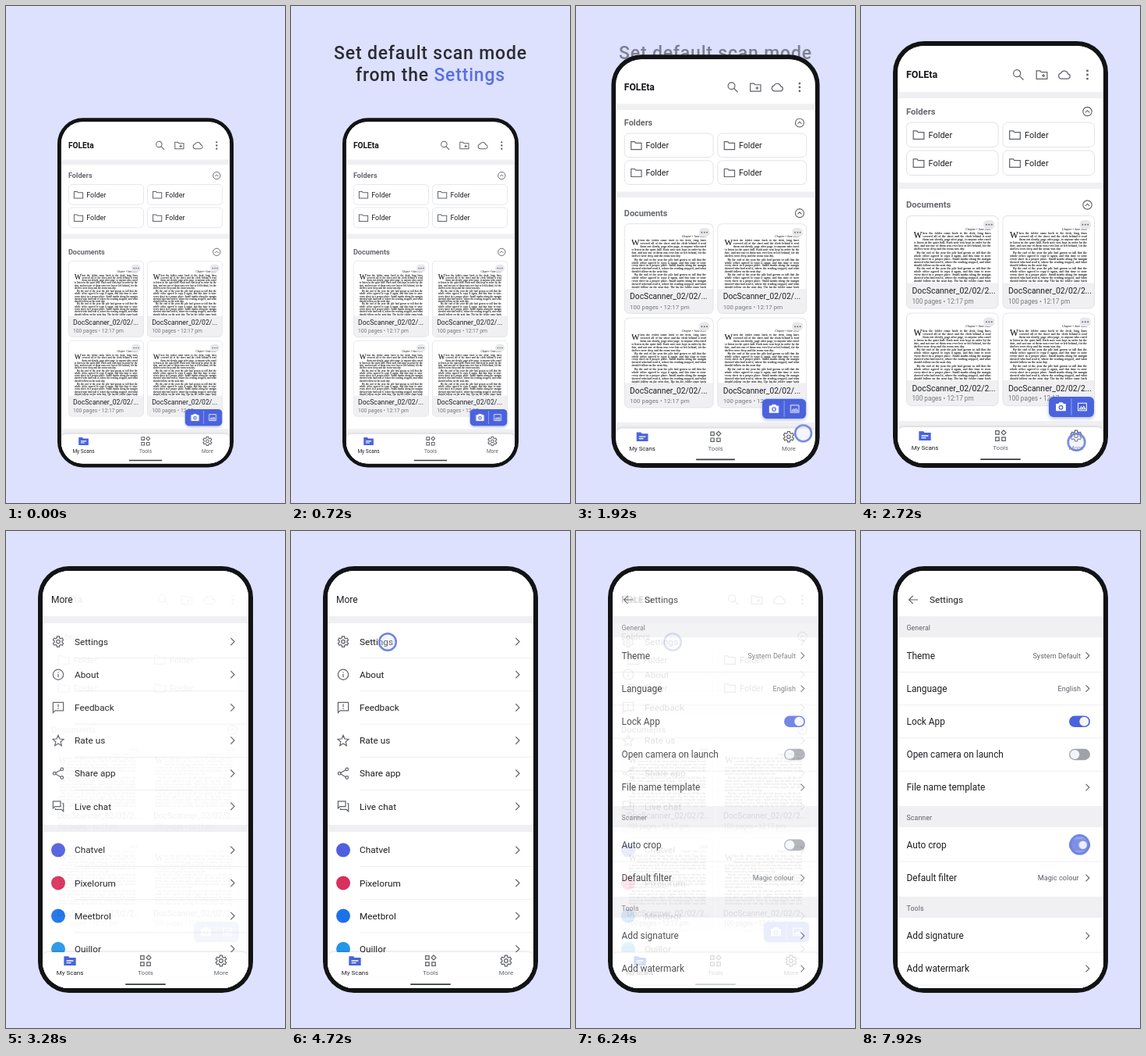
Animation of 358 by 636 pixels, one loop 8000 ms. Source, as an HTML page:

```html
<!DOCTYPE html>
<html lang="en">
<head>
<meta charset="utf-8">
<title>Scan settings</title>
<style>
  html, body { margin: 0; width: 100%; height: 100%; overflow: hidden; background: #dde1fd; }
  #stage { position: relative; width: 358px; height: 636px; overflow: hidden; font-family: Roboto, "Liberation Sans", sans-serif; }
  #title { position: absolute; top: 46.5px; width: 358px; text-align: center; font-size: 23px; line-height: 28px; font-weight: 500; letter-spacing: .8px; color: #17181c; white-space: nowrap; }
  #title b { font-weight: 500; color: #4a63dd; }
  #phone { position: absolute; inset: 0; transform-origin: 179px 588px; }
  #body { position: absolute; left: 41px; top: 45px; width: 276px; height: 546px; border-radius: 40px; background: #121314; }
  #screen { position: absolute; left: 47px; top: 51px; width: 264px; height: 534px; border-radius: 34px; overflow: hidden; background: #fff; }
  #screen > svg { position: absolute; left: -47px; top: -51px; width: 358px; height: 636px; }
  svg text { white-space: pre; }
  .page { font: 500 4px/4.1px "Liberation Serif", "Noto Serif", serif; color: #111; text-align: justify; -webkit-text-stroke: .08px #111; }
  .page p { margin: 0; text-indent: 4px; }
  .page p:first-child { text-indent: 0; }
  .page i { float: left; font-size: 11.5px; line-height: 8.2px; margin-right: 1px; font-style: normal; }
</style>
</head>
<body>
<div id="stage">
  <div id="title">Set default scan mode<br>from the <b>Settings</b></div>
  <div id="phone"><div id="body"></div><div id="screen"></div></div>
</div>
<script>
const BLUE = '#4a63dd', INK = '#1e1f23', GREY = '#5f6268', PALE = '#f0f0f3';
const LOOP = 8000;

// drawing helpers
const rect = (x, y, w, h, fill, r = 0, more = '') =>
  `<rect x="${x}" y="${y}" width="${w}" height="${h}" rx="${r}" fill="${fill}" ${more}/>`;
const disc = (x, y, r, fill, more = '') => `<circle cx="${x}" cy="${y}" r="${r}" fill="${fill}" ${more}/>`;
const text = (x, y, str, size, fill = INK, more = '') =>
  `<text x="${x}" y="${y + size * .355}" font-size="${size}" fill="${fill}" ${more}>${str}</text>`;
const path = (d, more = '') => `<path d="${d}" ${more}/>`;
const layer = (id, body) => `<svg id="${id}" viewBox="0 0 358 636">${body}</svg>`;

function gearPath() {
  const pts = [];
  for (let i = 0; i < 6; i++) {
    for (const [turn, r] of [[-.34, 7], [-.22, 9.6], [.22, 9.6], [.34, 7]]) {
      const a = i * Math.PI / 3 + turn - Math.PI / 2;
      pts.push((12 + r * Math.cos(a)).toFixed(2) + ' ' + (12 + r * Math.sin(a)).toFixed(2));
    }
  }
  return 'M' + pts.join('L') + 'z';
}

const FOLDER = 'M2.5 5h6.5l2 2.4h10.500v12h-19z';
const icons = {
  search: disc(9.5, 9.5, 6.3, 'none') + path('M14.200 14.200L21 21'),
  folder: path(FOLDER),
  folderAdd: path(FOLDER) + path('M15 10.500v6M12 13.500h6'),
  cloud: path('M6.500 19a5 5 0 0 1-.6-9.900A6.500 6.500 0 0 1 18.200 10.500a4.300 4.300 0 0 1 .3 8.500z'),
  dots: [5, 12, 19].map(y => disc(12, y, 1.1, 'currentColor')).join(''),
  up: disc(12, 12, 8.6, 'none') + path('M8 14l4-4 4 4'),
  gear: path(gearPath()) + disc(12, 12, 3.1, 'none'),
  info: disc(12, 12, 9.2, 'none') + path('M12 11v6M12 7v2'),
  feedback: path('M2.800 3h18.400v14.500H6.500l-3.700 3.700zM12 6v5M12 13v2'),
  star: path('M12 2.800l2.700 6.400 6.900.6-5.200 4.600 1.600 6.800-6-3.600-6 3.600 1.600-6.800-5.200-4.600 6.900-.6z'),
  share: path('M7.500 11l9-5.300M7.500 13l9 5.300') + disc(5.3, 12, 2.5, 'none') + disc(18.6, 4.6, 2.5, 'none') + disc(18.6, 19.4, 2.5, 'none'),
  chat: path('M2.800 3h13.400v9.500H6l-3.200 3zM19 7h2.300v14l-3.300-3.300H7v-2.500'),
  next: path('M9 5.500l6.500 6.500L9 18.500'),
  back: path('M21 12H4M11.500 4.500L4 12l7.500 7.500'),
  tools: path('M3.500 3.500h6v6h-6zM3.500 14.500h6v6h-6zM14.500 14.500h6v6h-6zM17.500 2.500l4 4-4 4-4-4z'),
  scans: path(FOLDER, 'fill="currentColor"') + path('M6 12h12M6 15.500h8', 'stroke="#fff"'),
  camera: path('M3 6.500h4l2-2.500h6l2 2.500h4v13H3z', 'fill="currentColor"') + disc(12, 13, 3.7, BLUE, `stroke="${BLUE}"`) + disc(12, 13, 1.6, '#fff'),
  image: path('M3 4h18v16H3zM6 16.500l3.500-4.500 2.500 3 3-4 3.500 5.500z')
};
const icon = (name, x, y, color = GREY, scale = .72) =>
  `<g transform="translate(${x} ${y}) scale(${scale}) translate(-12 -12)" fill="none" stroke="currentColor" stroke-width="1.7" color="${color}">${icons[name]}</g>`;

const strip = (y, h) => rect(47, y, 264, h, PALE);
const rule = (x, y) => rect(x, y, 311 - x, .8, '#ececf0');

// home screen
const words = 'hen the folder came back to the desk, long lines covered all of the sheet and the clerk behind it read them out slowly, page after page, to anyone who cared to listen in the quiet hall. ' +
  'Each note was kept in order by the date, and not one of them was ever lost or left behind, for the shelves were deep and the room was dry. ';
const more = 'By the end of the year the pile had grown so tall that the whole office agreed to copy it again, and this time to store every sheet in a proper place. ' +
  'Small marks along the margin showed who had read it, where the reading stopped, and what should follow on the next day. ';
const pageText = `<p><i>W</i>${words}</p><p>${more}</p><p>${more}The h${words.slice(2)}</p><p>${more}</p>`;

function folderCard(x, y) {
  return rect(x, y, 117.5, 31.5, '#fff', 6, 'stroke="#e1e2e7"') + icon('folder', x + 15.5, y + 16) + text(x + 28, y + 16, 'Folder', 11);
}

function docCard(x, y) {
  return rect(x, y, 117.5, 118.500, PALE, 6, 'stroke="#e1e2e7"') +
    path(`M${x + .5} ${y + 86}v-80a6 6 0 0 1 6 -5.500h104.500a6 6 0 0 1 6 5.500v80z`, 'fill="#fff"') +
    text(x + 108, y + 17, 'Chapter • June 2020', 3.9, '#111', 'text-anchor="end" font-family="Liberation Serif, serif" font-style="italic"') +
    `<foreignObject x="${x + 9}" y="${y + 20.5}" width="99" height="65.300"><div class="page">${pageText}</div></foreignObject>` +
    rect(x + 98.5, y + 5.5, 14.5, 11.5, '#e7e8eb', 5.5) +
    [-3.4, 0, 3.4].map(d => disc(x + 105.8 + d, y + 11.3, 1, '#6b6d72')).join('') +
    text(x + 7, y + 96, 'DocScanner_02/02/...', 10.6, INK, 'class="short"') +
    text(x + 7, y + 96, 'DocScanner_02/02/2...', 10.45, INK, 'class="long"') +
    text(x + 7, y + 109.5, '100 pages • 12:17 pm', 8.2, '#74777d');
}

const grid = (draw, ys) => ys.map(y => draw(58.5, y) + draw(182, y)).join('');
const section = (y, name) => text(58, y, name, 11.2, '#66686e', 'font-weight="600"') + icon('up', 290.5, y, GREY, .66);

const home = layer('home',
  rect(47, 51, 264, 534, '#fff') +
  text(58, 88, 'FOLEta', 12.5, '#17181c', 'font-weight="700"') +
  icon('search', 202, 88) + icon('folderAdd', 232, 88) + icon('cloud', 261, 88) + icon('dots', 290.5, 88) +
  strip(110, 8) + section(135, 'Folders') + grid(folderCard, [149, 185]) +
  strip(226, 8) + section(254.5, 'Documents') + grid(docCard, [268.5, 393]) +
  strip(531, 10) +
  `<g style="filter:drop-shadow(0 2px 2px #4a63dd66)">${rect(241, 500, 58, 26, BLUE, 6)}</g>` +
  rect(269.6, 502.5, .8, 21, '#a9b5f2') + icon('camera', 256.5, 513, '#fff', .64) + icon('image', 284, 513, '#fff', .6));

// "More" screen
const listRow = (y, mark, label) => mark + text(88, y, label, 11.8) + icon('next', 290.5, y);
const menu = [['gear', 'Settings'], ['info', 'About'], ['feedback', 'Feedback'], ['star', 'Rate us'], ['share', 'Share app'], ['chat', 'Live chat']];
const social = [['#4f5fe0', 'Chatvel'], ['#d92f5c', 'Pixelorum'], ['#1b72e8', 'Meetbrol'], ['#2496e8', 'Quillor']];
const STEP = 42.15;
const moreScreen = layer('more',
  rect(47, 51, 264, 534, '#fff') + text(58, 88, 'More', 12) + strip(109, 9) +
  menu.map(([name, label], i) => {
    const y = 141.6 + i * STEP;
    return listRow(y, icon(name, 67, y), label) + (i < 5 ? rule(88, y + 20.8) : '');
  }).join('') +
  strip(376, 9) +
  social.map(([color, label], i) => {
    const y = 408.3 + i * STEP;
    return listRow(y, disc(67, y, 9, color), label) + (i < 3 ? rule(88, y + 20.8) : '');
  }).join(''));

const tab = (x, name, label, color, ink) => icon(name, x, 550, color, .74) + text(x, 565.500, label, 8, ink, 'text-anchor="middle"');
const nav = layer('nav',
  `<g style="filter:drop-shadow(0 -1px 1.500px #0000001f)">${rect(47, 539, 264, 60, '#fff', 8)}</g>` +
  tab(82, 'scans', 'My Scans', BLUE, INK) + tab(179, 'tools', 'Tools', GREY, GREY) + tab(276, 'gear', 'More', GREY, GREY) +
  rect(153, 579.3, 52, 1.6, '#3a3b40', .8));

// settings screen
const heading = (y, label) => strip(y, 27) + text(58.5, y + 14.7, label, 8.8, GREY, 'letter-spacing=".1"');
const toggle = (y, on, id = '') =>
  rect(267, y - 7.2, 27, 14.4, on ? BLUE : '#9fa2a8', 7.2, id && `id="${id}Track"`) +
  disc(on ? 286.3 : 274.3, y, 6, '#f4f5fa', id && `id="${id}Knob"`);
function settingRow(y, label, side = '', line = true) {
  return text(58.5, y, label, 11.85) + side + (line ? rule(47, y + 20.8) : '');
}
const choice = (y, value = '', end = 282) =>
  text(end, y, value, 9.1, GREY, 'text-anchor="end"') + icon('next', 290.5, y, GREY, .66);

const settings = layer('settings',
  rect(47, 51, 264, 534, '#fff') + icon('back', 67, 88, GREY, .68) + text(88, 88, 'Settings', 11.8) +
  heading(109, 'General') +
  settingRow(159.5, 'Theme', choice(159.5, 'System Default')) +
  settingRow(201.6, 'Language', choice(201.6, 'English')) +
  settingRow(243.8, 'Lock App', toggle(243.8, true)) +
  settingRow(286, 'Open camera on launch', toggle(286, false)) +
  settingRow(328.100, 'File name template', choice(328.100), false) +
  heading(352, 'Scanner') +
  settingRow(401.800, 'Auto crop', disc(280.5, 401.3, 11.5, '#6a80e6', 'id="press"') + toggle(401.8, false, 'crop')) +
  settingRow(444, 'Default filter', choice(444, 'Magic colour', 279.500), false) +
  heading(468, 'Tools') +
  settingRow(518, 'Add signature', choice(518)) +
  settingRow(560, 'Add watermark', choice(560)));

const ring = layer('touch', `<g id="ring">${disc(0, 0, 10.8, '#dfe3fb', 'fill-opacity=".35" stroke="#6f84de" stroke-width="2.5"')}</g>`);

const $ = sel => [...document.querySelectorAll(sel)];
$('#screen')[0].innerHTML = home + moreScreen + nav + settings + ring;

// steps: [time in ms, properties, easing to the next step]
const began = document.timeline.currentTime || 0;
function play(sel, steps) {
  const frames = steps.map(([at, props, easing = 'linear']) => ({ offset: at / LOOP, easing, ...props }));
  frames.unshift({ ...frames[0], offset: 0, easing: 'linear' });
  frames.push({ ...frames[frames.length - 1], offset: 1 });
  for (const el of $(sel)) el.animate(frames, { duration: LOOP, iterations: Infinity }).startTime = began;
}
const fade = (sel, ...pairs) => play(sel, pairs.map(([at, opacity]) => [at, { opacity }]));
const at = (x, y, s = 1) => ({ transform: `translate(${x}px, ${y}px) scale(${s})` });
const GLIDE = 'cubic-bezier(.65, 0, .35, 1)';
const HOLD = 'step-end';

fade('#title', [0, 0], [800, 1], [1750, 1], [2080, 0]);
play('#phone', [[1120, { transform: 'scale(.819)' }, GLIDE], [2360, { transform: 'scale(1)' }]]);
play('.short', [[2040, { opacity: 1 }, HOLD], [2041, { opacity: 0 }]]);
play('.long', [[2040, { opacity: 0 }, HOLD], [2041, { opacity: 1 }]]);

fade('#more', [2790, 0], [3310, 1], [5850, 1], [6500, .2], [6501, 0]);
fade('#settings', [5850, 0], [6360, 1]);

play('#ring', [
  [1360, at(324, 526.5), 'ease-in-out'],
  [2360, at(276.5, 558), HOLD],
  [3500, at(124, 142), HOLD],
  [7000, at(280.5, 401.3)],
  [7760, at(280.5, 401.3)],
  [7920, at(280.5, 401.3, 1.1)]
]);
fade('#ring', [1360, 0], [1760, 1], [2790, 1], [3200, 0], [3920, 0], [4320, 1], [5850, 1], [6360, 0], [7440, 0], [7680, 1]);
fade('#press', [7740, 0], [7880, 1]);
play('#cropTrack', [[7760, { fill: '#9fa2a8' }], [7880, { fill: BLUE }]]);
play('#cropKnob', [
  [7760, { transform: 'translateX(0)', rx: '6px', r: '6px' }, 'ease-in-out'],
  [7920, { transform: 'translateX(10.4px)', r: '5.2px' }]
]);
</script>
</body>
</html>
```
